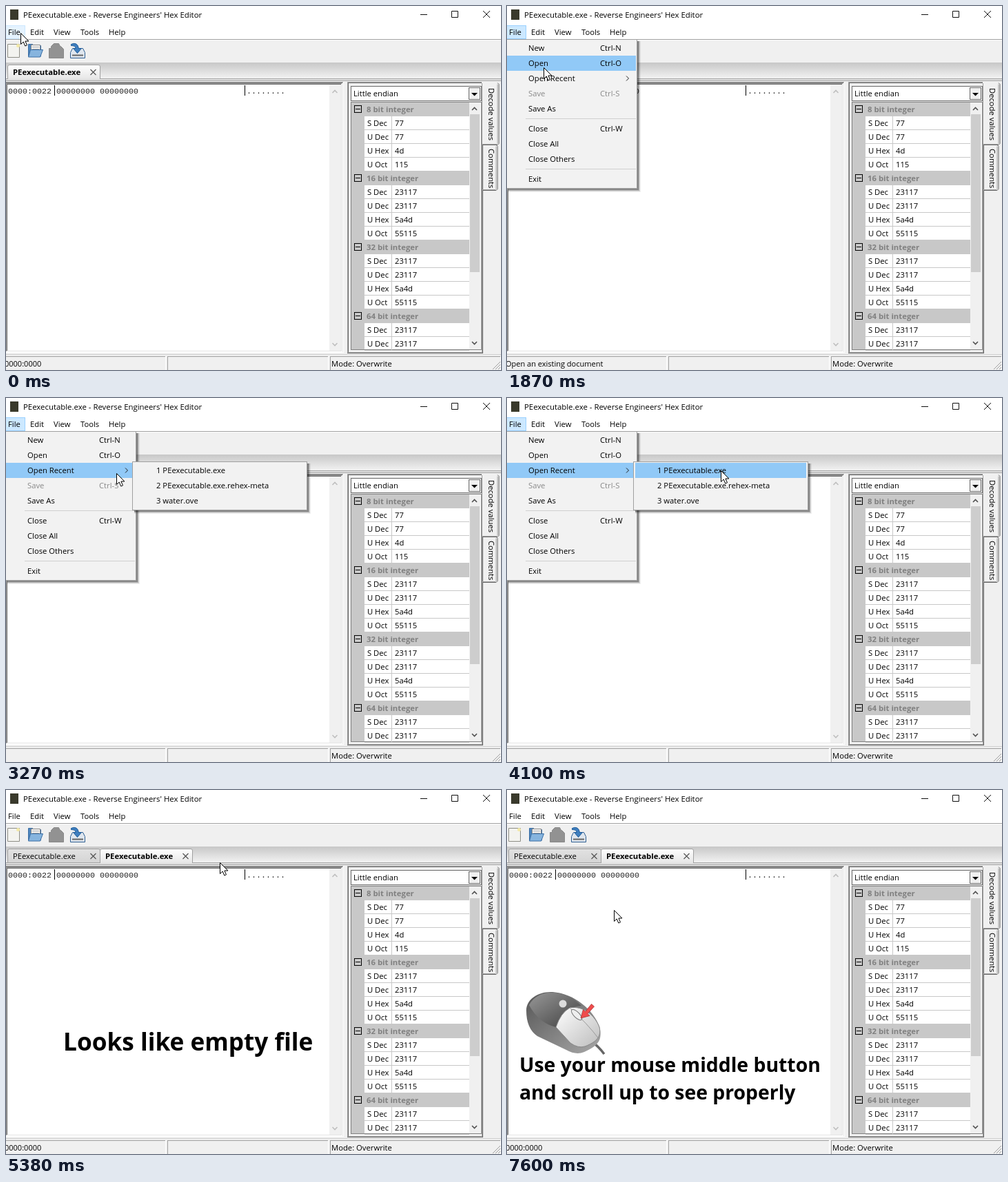
Animation of 718x528 px, one loop 8000 ms. Source, as an HTML page:

```html
<!DOCTYPE html>
<html lang="en">
<head>
<meta charset="utf-8">
<title>Hex editor</title>
<style>
html, body { margin: 0; width: 100%; height: 100%; overflow: hidden; background: #fff; }
svg { display: block; font: 11.25px "Open Sans", "Noto Sans", sans-serif; }
rect, line { shape-rendering: crispEdges; }
text { white-space: pre; }
.bold { font-weight: 700; font-size: 11.35px; }
.mono { font: 11.67px "Liberation Mono", monospace; }
.caption { font-weight: 700; }
</style>
</head>
<body>
<svg id="stage" width="718" height="528" viewBox="0 0 718 528"></svg>
<script>
const rect = (x, y, w, h, fill, more = '') =>
  `<rect x="${x}" y="${y}" width="${w}" height="${h}" fill="${fill}" ${more}/>`;
const box = (x, y, w, h, fill, stroke, more = '') =>
  rect(x + .5, y + .5, w - 1, h - 1, fill, `stroke="${stroke}" ${more}`);
const text = (x, y, s, fill = '#000', more = '') =>
  `<text x="${x}" y="${y}" fill="${fill}" ${more}>${s}</text>`;
const path = (d, stroke, fill = 'none', w = 1) =>
  `<path d="${d}" stroke="${stroke}" fill="${fill}" stroke-width="${w}"/>`;
const group = (id, body) => `<g id="${id}">${body}</g>`;
const chevron = (x, y, dir, color) =>
  path(`M${x - 3.5} ${y + 2 * dir}l3.5 ${-3.5 * dir}l3.5 ${3.5 * dir}`, color, 'none', 1.6);
const gradient = (id, a, b, diagonal) =>
  `<linearGradient id="${id}" x2="${diagonal ? 1 : 0}" y2="1"><stop stop-color="${a}"/><stop offset="1" stop-color="${b}"/></linearGradient>`;

// Nested one pixel frames: top-left colour, then bottom-right colour.
const bevel = (x, y, w, h, light, dark) =>
  rect(x, y, w, h, dark) + rect(x, y, w - 1, h - 1, light);
const sunken = (x, y, w, h, fill) =>
  bevel(x, y, w, h, '#a0a0a0', '#fff') +
  bevel(x + 1, y + 1, w - 2, h - 2, '#696969', '#e3e3e3') +
  rect(x + 2, y + 2, w - 4, h - 4, fill);

const defs = '<defs>' +
  gradient('strip', '#c7c7c7', '#f2f2f2') +
  gradient('tabOn', '#ffffff', '#e6e6e6') +
  gradient('tabOff', '#e2e2e2', '#d4d4d4') +
  gradient('palm', '#989898', '#404040', true) +
  gradient('buttons', '#ffffff', '#bdbdbd', true) +
  gradient('rim', '#555555', '#a8a8a8', true) + '</defs>';

function titleBar() {
  return rect(6, 5, 12, 15, '#3a3a2c') +
    text(25, 17, "PEexecutable.exe - Reverse Engineers' Hex Editor", '#000', 'font-size="11.4"') +
    path('M601 12.5h10M646.5 7.5h9v9h-9zM692 7l10 10M702 7l-10 10', '#111');
}

function menuBar() {
  const labels = [['File', 3], ['Edit', 35], ['View', 69], ['Tools', 108], ['Help', 149]];
  const hover = (id, x, w) => group(id, box(x, 28, w, 20, '#e5f3ff', '#cce8ff'));
  return hover('fileHover', -1, 29) + hover('viewHover', 63, 38) +
    group('fileDown', box(-1, 28, 29, 20, '#cce8ff', '#99d1ff')) +
    labels.map(([s, x]) => text(x, 42, s)).join('');
}

function toolBar() {
  return rect(0, 48, 718, 34, '#f0f0f0') +
    rect(0, 48, 718, 1, '#a0a0a0') + rect(0, 49, 718, 1, '#fff') +
    path('M2.5 55.5h17v19h-17z', '#8e8e86', '#f3f3ef') +
    `<circle cx="17.5" cy="57.5" r="2.5" fill="#f3e9a8"/>` +
    path('M32.5 73V55.5h6l2 2h10V73z', '#3a6ea5', '#4f86bd') +
    path('M36.5 56.5h13v10h-13z', '#888', '#f4f4f4') +
    path('M38 59.5h10M38 62.5h10', '#aaa') +
    path('M35.5 63.5h18l-4 10.500h-17z', '#3a6ea5', '#86b4de') +
    path('M62.5 75.5v-14h3v-3l4-4h7l2 4h1l4 4v13z', '#898989', '#929292') +
    path('M93.5 67.5l3-6h15l3 6v8h-21z', '#2f5f92', '#dfe6ee') +
    path('M96 71.5h16', '#666', 'none', 2) +
    path('M94.5 55.5q9-4 11 6h4l-6 7-6-7h3.5q0-4-6.5-4z', '#1f5c99', '#3f7fbf');
}

function tab(x, on) {
  return path(`M${x + .5} 106V88q0-2.5 2.5-2.5h129q2.500 0 2.500 2.500V106`,
      '#a0a0a0', `url(#${on ? 'tabOn' : 'tabOff'})`) +
    (on ? '' : rect(x, 105, 135, 1, '#a6a6a6')) +
    text(x + 8, 100, 'PEexecutable.exe', '#000', on ? 'class="bold"' : '') +
    path(`M${x + 120.5} 92l8 8m0-8l-8 8`, '#555', 'none', 1.2);
}

function tabStrip() {
  return rect(0, 82, 718, 23, 'url(#strip)') +
    rect(0, 105, 718, 4, '#a6a6a6') + rect(0, 106, 718, 2, '#ddd') +
    group('oneTab', tab(2, true)) +
    group('twoTabs', tab(2, false) + tab(136, true));
}

function hexView() {
  return rect(0, 109, 718, 396, '#f0f0f0') +
    sunken(-2, 110, 492, 393, '#f0f0f0') + sunken(0, 112, 488, 390, '#fff') +
    rect(469, 114, 17, 386, '#f0f0f0') +
    chevron(477, 124, 1, '#bfbfbf') + chevron(477, 491, -1, '#bfbfbf') +
    text(3, 127, '0000:0022', '#222', 'class="mono"') +
    text(73, 127, '00000000 00000000', '#222', 'class="mono"') +
    text(349, 127, '........', '#222', 'class="mono"') +
    rect(70, 115, 1, 15, '#000') + rect(346, 115, 1, 15, '#000');
}

function valueGrid() {
  const names = ['S Dec', 'U Dec', 'U Hex', 'U Oct'];
  const wide = ['23117', '23117', '5a4d', '55115'];
  const sets = [[8, ['77', '77', '4d', '115']], [16, wide], [32, wide], [64, wide.slice(0, 2)]];
  let out = box(500, 139, 190, 360, '#fff', '#828282') + rect(501, 140, 19, 358, '#c8c8c8');
  sets.forEach(([bits, values], i) => {
    const top = 140 + 100 * i;
    out += rect(501, top, 171, 20, '#c8c8c8') +
      box(505, top + 4, 11, 11, '#c8c8c8', '#000') + rect(507, top + 9, 7, 1, '#000') +
      text(523, top + 14, bits + ' bit integer', '#808080', 'class="bold"');
    values.forEach((v, k) => {
      const y = top + 20 * (k + 1);
      out += rect(520, y + 19, 152, 1, '#c8c8c8') + rect(559, y, 1, 20, '#c8c8c8') +
        text(524, y + 14, names[k]) + text(564, y + 14, v);
    });
  });
  return out + rect(672, 140, 16, 358, '#f0f0f0') + rect(673, 157, 14, 229, '#cdcdcd') +
    chevron(679.5, 149, 1, '#505050') + chevron(679.5, 489, -1, '#505050');
}

function sidePanel() {
  const sideTab = (y, h, w, inset, s) =>
    path(`M691 ${y + h - .5}h${w - 3}l2-2v${4 - h}l-2-2`, '#696969') +
    path(`M691 ${y + h - 1.5}h${w - 4}l1-1v${4 - h}`, '#a0a0a0') +
    `<g transform="translate(700 ${y + inset}) rotate(90)">${text(0, 0, s)}</g>`;
  return sunken(495, 110, 230, 394, '#f0f0f0') + rect(690, 110, 28, 395, '#f0f0f0') +
    rect(495, 502, 196, 1, '#a0a0a0') + rect(495, 503, 197, 1, '#696969') +
    rect(690, 112, 1, 391, '#a0a0a0') + rect(691, 202, 1, 302, '#696969') +
    box(500, 116, 190, 22, '#fff', '#696969') + text(504, 131, 'Little endian') +
    box(671, 118, 17, 18, '#f0f0f0', '#696969') + path('M675 126h9l-4.5 4.5z', 'none', '#000') +
    valueGrid() +
    sideTab(112, 90, 25, 7, 'Decode values') + sideTab(202, 66, 23, 5, 'Comments');
}

function statusBar() {
  const field = (x, w) => rect(x, 508, w, 1, '#a0a0a0') + rect(x, 508, 1, 20, '#a0a0a0') +
    rect(x + w - 1, 508, 1, 20, '#fff');
  return rect(0, 504, 718, 24, '#f0f0f0') + rect(0, 505, 718, 1, '#d0d0d0') +
    field(-2, 234) + field(234, 234) + field(470, 248) +
    text(-2, 523, '', '#000', 'id="status" font-size="11"') + text(472, 523, 'Mode: Overwrite') +
    path('M706 527l11-11M710 527l7-7M714 527l3-3', '#a0a0a0');
}

const panel = (x, y, w, h) =>
  [[5, .06], [4, .1], [3, .16], [2, .25]].map(([d, a]) =>
    rect(x + 3, y + 3, w + d - 3, h + d - 3, '#000', `opacity="${a}"`)).join('') +
  box(x, y, w, h, '#f2f2f2', '#a0a0a0');

function fileMenu() {
  const items = [[50, 'New', 'Ctrl-N'], [72, 'Open', 'Ctrl-O'], [94, 'Open Recent'],
    [116, 'Save', 'Ctrl-S'], [138, 'Save As'], [167, 'Close', 'Ctrl-W'],
    [189, 'Close All'], [211, 'Close Others'], [240, 'Exit']];
  return panel(-1, 48, 190, 217) + rect(0, 50, 187, 22, '#91c9f7', 'id="pick"') +
    items.map(([y, s, key = '']) => {
      const color = s === 'Save' ? '#8a8a8a' : '#000';
      return text(31, y + 15, s, color) + text(135, y + 15, key, color);
    }).join('') +
    path('M173 101.5l3.5 3.5-3.5 3.5', '#222') +
    rect(27, 163, 160, 1, '#d0d0d0') + rect(27, 236, 160, 1, '#d0d0d0');
}

function recentMenu() {
  const files = ['PEexecutable.exe', 'PEexecutable.exe.rehex-meta', 'water.ove'];
  return panel(183, 92, 254, 71) + rect(186, 94, 248, 22, '#91c9f7', 'id="subPick"') +
    files.map((s, i) => text(218, 109 + 22 * i, `${i + 1} ${s}`)).join('');
}

function mouseHint() {
  return path('M124 366q8 5 17 17', '#666', 'none', 3.5) +
    path('M28 320C28 303 46 292 66 293C98 295 126 320 134 343C139 362 133 371 112 380Q100 385 86 377L44 357Q28 346 28 320z', 'none', 'url(#rim)') +
    path('M32 312C42 294 62 291 80 296Q96 301 108 313Q86 313 71 344Q46 338 32 312z', 'none', 'url(#palm)') +
    path('M91 316C111 312 128 328 134 344C137 357 131 365 113 372Q103 375 92 367L71 344Q78 323 91 316z', '#888', 'url(#buttons)') +
    path('M92 317Q116 338 134 362', '#999') +
    `<ellipse cx="101" cy="326" rx="10" ry="4" transform="rotate(45 101 326)" fill="#eee" stroke="#777"/>` +
    `<circle cx="81" cy="310" r="5.500" fill="#dcdcdc"/>` +
    path('M107 331l3.5-12.500 3 3 9-11 4 3.500-9.500 10.500 3 3z', '#a33', '#f04c4c', .8) +
    text(18, 409, 'Use your mouse middle button', '#000', 'class="caption" font-size="28.35"') +
    text(18, 449, 'and scroll up to see properly', '#000', 'class="caption" font-size="28.35"');
}

const pointer = group('pointer',
  path('M.5 .5v16l3.7-3.5 2.6 6 2.7-1.2-2.6-5.8h5z', '#000', '#fff'));

document.getElementById('stage').innerHTML = defs + rect(0, 0, 718, 528, '#fff') +
  titleBar() + menuBar() + toolBar() + tabStrip() + hexView() + sidePanel() + statusBar() +
  group('emptyHint', text(83, 378, 'Looks like empty file', '#000', 'class="caption" font-size="35.2"')) +
  group('mouseHint', mouseHint()) +
  group('fileMenu', fileMenu()) + group('recentMenu', recentMenu()) + pointer;

// Screen is sampled in ticks; pointer stops are [tick, x, y].
const LOOP = 8000, TICK = 116.6;
const stops = [[0, 21, 39], [1, 21, 38], [3, 20, 38], [6, 20, 38], [9, 25, 54],
  [14, 43, 92], [15, 43, 92], [16, 53, 89], [18, 53, 89], [19, 53, 95], [20, 52, 97],
  [24, 52, 97], [28, 160, 109], [31, 228, 118], [32, 262, 118], [35, 310, 105],
  [53, 310, 105], [54, 312, 104], [55, 312, 104], [59, 90, 40], [60, 90, 40],
  [65, 155, 174], [70, 155, 174]];

const el = id => document.getElementById(id);
const show = (id, on) => el(id).setAttribute('opacity', +on);
const within = (n, a, b) => n >= a && n < b;
const fade = (n, a, b) => within(n, a, b) ? Math.min(1, (n - a + 1) * .29) : 0;

function pointerAt(n) {
  const i = stops.findIndex(s => s[0] > n);
  const [t0, x0, y0] = stops[i - 1], [t1, x1, y1] = stops[i];
  const k = (n - t0) / (t1 - t0);
  return [Math.round(x0 + (x1 - x0) * k), Math.round(y0 + (y1 - y0) * k)];
}

function statusAt(n) {
  if (within(n, 9, 11)) return 'Create new document';
  if (within(n, 11, 19)) return 'Open an existing document';
  return within(n, 3, 42) || within(n, 57, 59) ? '' : '0000:0000';
}

function draw(now) {
  const n = Math.floor((now % LOOP + 6) / TICK);
  const [x, y] = pointerAt(n);
  el('pointer').setAttribute('transform', `translate(${x} ${y})`);
  el('status').textContent = statusAt(n);
  show('fileHover', n < 3);
  show('fileDown', within(n, 3, 41));
  show('viewHover', within(n, 58, 62));
  show('fileMenu', fade(n, 3, 41));
  show('recentMenu', fade(n, 25, 41));
  show('pick', within(n, 9, 41));
  el('pick').setAttribute('y', n < 11 ? 50 : n < 19 ? 72 : 94);
  show('subPick', within(n, 30, 41));
  el('subPick').setAttribute('y', within(n, 31, 33) ? 116 : 94);
  show('oneTab', n < 43);
  show('twoTabs', n >= 43);
  show('emptyHint', within(n, 46, 63));
  show('mouseHint', n >= 63);
  requestAnimationFrame(draw);
}
requestAnimationFrame(draw);
</script>
</body>
</html>
```
